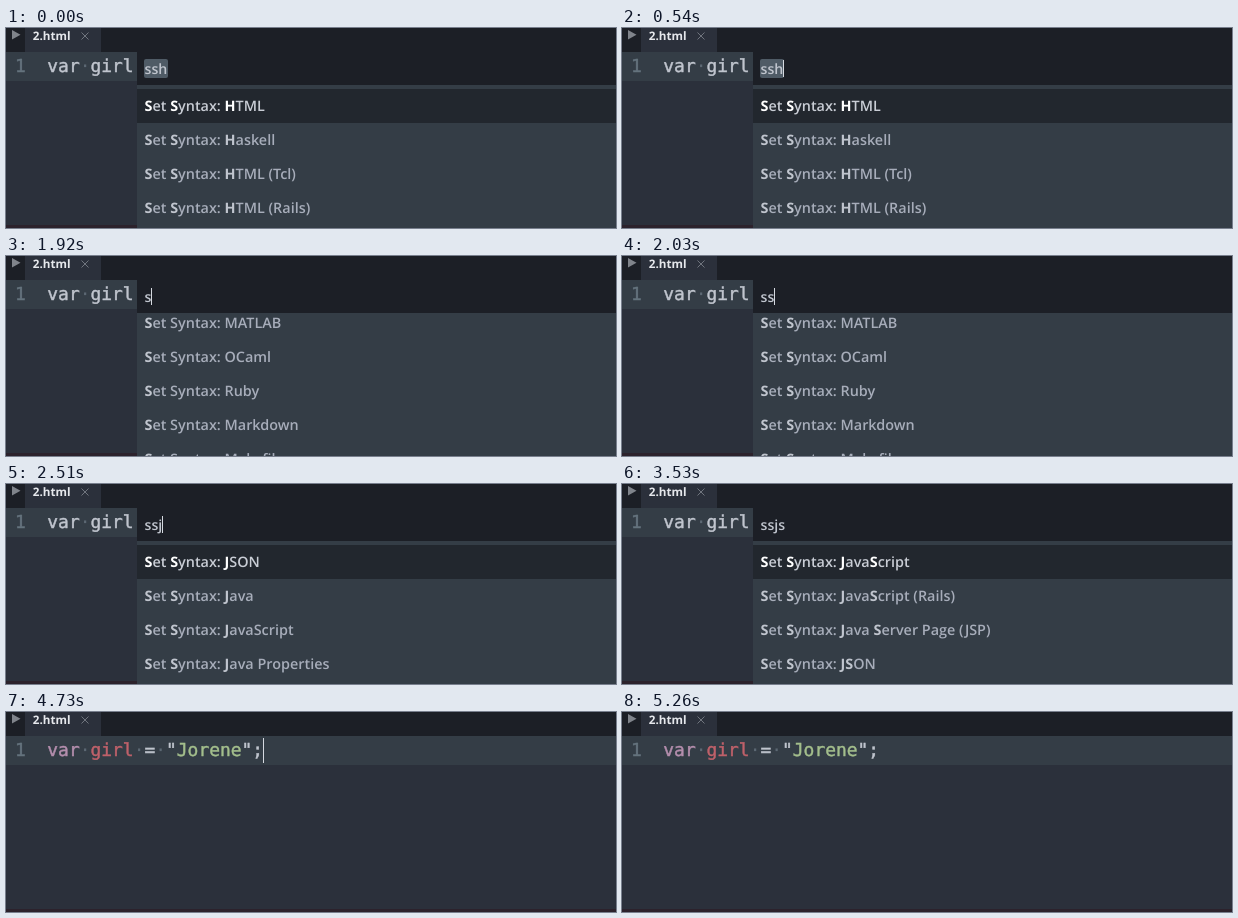
Animation of 610 by 200 pixels, one loop 5820 ms. Source, as an HTML page:

```html
<!DOCTYPE html>
<html lang="en">
<head>
<meta charset="utf-8">
<title>Switching syntax in an editor</title>
<style>
  html, body { margin: 0; width: 100%; height: 100%; overflow: hidden; background: #2b303b; }
  svg { display: block; }
  text { white-space: pre; text-rendering: geometricPrecision; }
  .ui { font: 600 14.4px "Open Sans", "Noto Sans", sans-serif; fill: #a7adba; }
  .ui .hit { font-weight: 700; fill: #c0c5ce; }
  .ui.selected { fill: #c9cdd5; }
  .ui.selected .hit { fill: #fff; }
  .ui.query { font-size: 14.2px; fill: #c0c5ce; }
  .tab { font: 700 11.7px "Open Sans", "Noto Sans", sans-serif; fill: #e6e8ec; }
  .code {
    font: 17.93px "DejaVu Sans Mono", monospace;
    color: #c0c5ce; fill: currentColor; stroke: currentColor; stroke-width: .45px;
  }
  .code tspan { fill: currentColor; stroke: currentColor; }
  .code .gutter { color: #65737e; }
  .code .space { color: #5c6873; stroke: none; }
  .code .keyword { color: #b48ead; }
  .code .name { color: #bf616a; }
  .code .string { color: #a3be8c; }
</style>
</head>
<body>
<svg id="stage" width="610" height="200" viewBox="0 0 610 200">
  <rect width="610" height="200" fill="#2b303b"/>
  <rect y="197" width="610" height="3" fill="#2c222c"/>
  <rect width="610" height="24" fill="#1c1f26"/>
  <path d="M19 24V0H95V24Z" fill="#2b303b"/>
  <path d="M6 2L14.5 6.8L6 11.6Z" fill="#80848b"/>
  <text class="tab" x="26.8" y="12">2.html</text>
  <path d="M75.5 4.5l7 7m0-7l-7 7" stroke="#70757e" fill="none"/>
  <rect y="24" width="610" height="29" fill="#343d46"/>
  <text class="code" x="9" y="44"><tspan class="gutter">1</tspan></text>
  <g id="scene"></g>
</svg>
<script>
const LOOP = 5820;
const ROW = 34;
const scene = document.getElementById("scene");

// Asterisks enclose the letters matched by the query.
const syntax = (...names) => names.map(name => "*S*et *S*yntax: " + name);
const LISTS = {
  html: syntax("*H*TML", "*H*askell", "*H*TML (Tcl)", "*H*TML (Rails)"),
  files: ["Copy Current File", "Delete Current File", "Delete File", "New File"].map(s => "ANF: " + s),
  all: syntax("MATLAB", "OCaml", "Ruby", "Markdown", "Makefile"),
  json: syntax("*J*SON", "*J*ava", "*J*avaScript", "*J*ava Properties"),
  script: syntax("*J*ava*S*cript", "*J*ava*S*cript (Rails)", "*J*ava *S*erver Page (JSP)", "*JS*ON"),
};
LISTS.single = LISTS.all.map(s => s.replace("*S*yntax", "Syntax"));

const rect = (x, y, w, h, fill, rx = 0) =>
  `<rect x="${x}" y="${y}" width="${w}" height="${h}" rx="${rx}" fill="${fill}"/>`;
const text = (cls, x, y, content) => `<text class="${cls}" x="${x}" y="${y}">${content}</text>`;
const span = (cls, content) => `<tspan class="${cls}">${content}</tspan>`;
const markHits = s => s.replace(/\*(.+?)\*/g, (_, hit) => span("hit", hit));
const dot = span("space", "·");

function palette({ query, list, caret, marked, scrolled }) {
  const top = scrolled ? 50 : 61;
  const rows = LISTS[list].map((item, i) =>
    text(!scrolled && i === 0 ? "ui selected" : "ui", 138.5, top + i * ROW + 22, markHits(item)));
  return text("code", 41.3, 44, `var${dot}girl`) +
    rect(131, 24, 479, 33, "#1c1f26") +
    rect(131, 57, 479, 143, "#343d46") +
    (scrolled ? "" : rect(131, top, 479, ROW, "#22272e")) +
    rows.join("") +
    (marked ? rect(138, 31, 24, 19, "#4f5b66", 2) : "") +
    text("ui query", 138.5, 46, query) +
    (caret ? rect(caret, 32, 1, 17, "#d5d9e0") : "");
}

function editor({ caret }) {
  const line = span("keyword", "var") + dot + span("name", "girl") + dot + "=" + dot +
    `"${span("string", "Jorene")}";`;
  return text("code", 41.3, 44, line) +
    (caret ? rect(caret, 26, 1, 25, "#d5d9e0") : "");
}

const STATES = [
  { at: 0, query: "ssh", list: "html", marked: true },
  { at: 540, query: "ssh", list: "html", marked: true, caret: 161 },
  { at: 900, query: "", list: "files", caret: 138 },
  { at: 1380, query: "", list: "files" },
  { at: 1920, query: "s", list: "single", scrolled: true, caret: 145 },
  { at: 2030, query: "ss", list: "all", scrolled: true, caret: 152 },
  { at: 2510, query: "ssj", list: "json", caret: 156 },
  { at: 2990, query: "ssjs", list: "script", caret: 163 },
  { at: 3530, query: "ssjs", list: "script" },
  { at: 3770, caret: 257 },
  { at: 4250 },
  { at: 4730, caret: 257 },
  { at: 5260 },
];

let shown;
const start = performance.now();
function draw() {
  const time = (performance.now() - start) % LOOP;
  const state = STATES.findLast(s => s.at <= time);
  if (state !== shown) {
    scene.innerHTML = state.list ? palette(state) : editor(state);
    shown = state;
  }
  requestAnimationFrame(draw);
}
draw();
</script>
</body>
</html>
```
